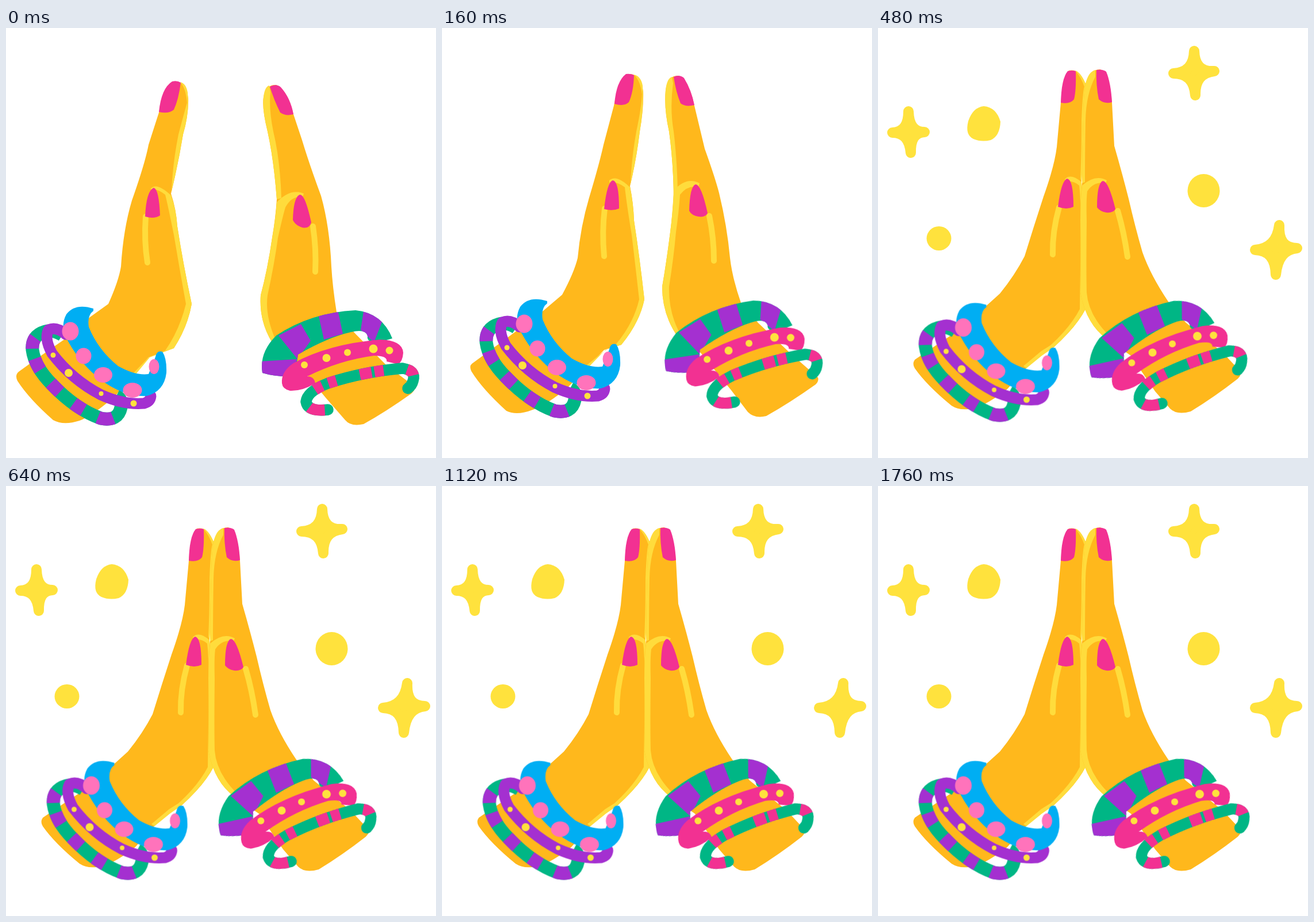
Recreate the animation shown at these times as an HTML page without scripts. Size 748 px wide and 748 px high, loop 1920 ms.

```html
<!DOCTYPE html>
<html lang="en">
<head>
<meta charset="utf-8">
<title>Folded hands</title>
<style>
html, body { margin: 0; width: 100%; height: 100%; overflow: hidden; background: #fff; }
svg { display: block; width: 100vw; height: 100vh; }

.skin { fill: #ffb81c; }
.light { fill: #ffdc3c; }
.nail, .pink { fill: #f23192; }
.crease { fill: none; stroke: #ffdc3c; stroke-width: 10; stroke-linecap: round; }
.band { fill: none; stroke-linejoin: round; }
.green { fill: #00b685; }
.purple { fill: #a430d0; }
.blue { fill: #00aef3; }
.rose { fill: #ff73bb; }
.gold { fill: #ffe23d; }
.star { stroke: #ffe23d; stroke-width: 18; stroke-linejoin: round; }

/* --a: apart, --b: near, --c: pressed */
.hand path { d: var(--c); animation: morph 1.92s infinite; }
.left { animation: slide-left 1.92s infinite; }
.right { transform-origin: 594px 564px; animation: slide-right 1.92s infinite; }
.sparkles { animation: blink 1.92s step-end infinite; }

@keyframes morph {
  0% { d: var(--a); animation-timing-function: steps(2); }
  8.33% { d: var(--b); animation-timing-function: steps(2); }
  16.66%, 100% { d: var(--c); }
}
@keyframes slide-left {
  0% { transform: none; animation-timing-function: steps(2); }
  8.33% { transform: translate(31px, -13px); animation-timing-function: steps(2); }
  16.66%, 100% { transform: translate(36.5px, -6.5px); }
}
@keyframes slide-right {
  0% { transform: translate(0, 0) rotate(0deg); animation-timing-function: steps(2); }
  8.33% { transform: translate(-60px, -16px) rotate(-5deg); animation-timing-function: steps(2); }
  16.66% { transform: translate(-82px, -15px) rotate(-9deg); }
  25% { transform: translate(-82px, -15px) rotate(-9deg); animation-timing-function: steps(4); }
  41.66%, 100% { transform: translate(-78px, -15px) rotate(-9deg); }
}
@keyframes blink {
  0%, 20.83%, 29.16%, 37.49%, 49.99%, 66.66%, 83.33% { visibility: hidden; }
  16.66%, 24.99%, 33.33%, 41.66%, 58.33%, 74.99%, 91.66%, 100% { visibility: visible; }
}
</style>
</head>
<body>
<svg viewBox="0 0 748 748">
  <defs>
    <clipPath id="wide">
      <path d="M446 600Q440 565 470 535Q530 495 608 491Q655 496 672 540L644 548Q627 546 629 536Q626 523 600 529Q560 538 508 568L506 582L490 606Q465 606 446 600Z"/>
    </clipPath>
    <path id="hoop" d="M98 534Q82 524 68 528Q44 535 46 560Q50 590 80 620Q121 663 165 679Q195 685 200 660Q202 645 192 640"/>
    <path id="coil" d="M560 664Q525 668 522 650Q524 632 560 618Q620 598 690 592Q714 596 708 614Q706 622 699 627"/>
  </defs>

  <g class="hand">
    <path class="skin" style="
      --a:path('M291 93Q313 91 317 122Q318 150 308 185Q300 235 287 288Q296 315 298 345Q308 410 323 480Q316 520 292 557L248 573L190 640Q150 675 128 683Q100 692 82 682Q40 645 20 614Q15 604 22 598Q66 566 104 540L146 503L178 480Q196 440 200 415Q204 350 219 300Q242 235 248 203L266 147Q272 110 291 93Z');
      --b:path('M324 80Q345 78 350 110Q351 140 344 180Q338 230 327 275Q333 305 334 335Q344 400 352 472Q344 512 312 551L282 560L220 624Q182 656 158 664Q130 675 112 666Q70 628 51 597Q47 588 52 584Q97 551 135 523L176 492L209 464Q230 425 236 400Q241 345 256 295Q274 235 281 203L299 135Q305 100 324 80Z');
      --c:path('M332 74Q350 70 361 97Q358 120 357 160Q357 220 354 268Q357 300 356 335Q359 400 361 489Q345 520 305 556L270 578L225 628Q190 655 170 660Q145 668 128 657Q85 622 64 592Q59 584 64 577Q102 551 140 526L181 490L212 462Q238 430 255 397Q271 345 288 293Q307 240 311 207L318 130Q322 90 332 74Z')"/>
    <path class="light" style="
      --a:path('M303 94Q313 96 316 112Q319 150 308 185Q300 235 287 288L288 283Q290 235 300 185Q312 140 315 130Q313 105 303 94Z');
      --b:path('M334 81Q346 84 349 100Q351 140 344 180Q338 230 327 275L328 268Q330 225 338 180Q347 138 348 115Q345 92 334 81Z');
      --c:path('M343 74Q352 76 361 97Q358 120 357 160Q357 220 354 268L352 262Q354 220 354 160Q356 110 359 102Q353 85 343 74Z')"/>
    <path class="light" style="
      --a:path('M252 279Q262 268 287 291Q296 315 298 345Q308 410 323 480Q316 520 292 557L250 573L226 602L222 600L248 573L277 561Q302 525 313 480Q302 420 292 360Q282 310 277 290Q262 278 252 282Z');
      --b:path('M291 265Q303 254 327 277Q333 305 334 335Q344 400 352 472Q344 512 312 551L284 560L255 590L250 588L282 562L301 552Q333 515 343 472Q336 410 330 360Q321 305 318 277Q303 266 291 269Z');
      --c:path('M325 263Q335 252 354 268Q357 300 356 335Q359 400 361 489Q345 520 305 556L285 570L258 592L253 588L284 562L300 552Q335 520 351 489Q352 410 353 360Q353 300 350 274Q338 264 325 268Z')"/>
    <path class="crease" style="
      --a:path('M243 328Q240 370 246 408');
      --b:path('M283 314Q278 355 282 397');
      --c:path('M315 312Q303 355 304 394')"/>
    <path class="nail" style="
      --a:path('M266 146Q270 105 289 93Q298 91 304 95Q300 125 292 142Q283 150 266 146Z');
      --b:path('M300 132Q303 93 320 80Q328 79 334 82Q333 112 325 129Q317 137 300 132Z');
      --c:path('M318 130Q319 88 330 75Q338 73 344 75Q345 108 341 124Q334 133 318 130Z')"/>
    <path class="nail" style="
      --a:path('M242 328Q244 283 257 278Q266 280 268 326Q258 333 242 328Z');
      --b:path('M282 315Q287 268 297 265Q308 266 308 314Q297 319 282 315Z');
      --c:path('M313 311Q319 265 329 262Q340 264 340 311Q328 317 313 311Z')"/>
  </g>

  <g class="hand">
    <path class="skin" style="
      --a:path('M470 99Q452 98 448 120Q445 140 455 180Q466 230 471 298Q469 330 463 365Q455 420 443 465Q440 510 463 547L500 575L556 643L590 682Q600 694 622 689Q660 668 705 636Q712 630 711 624L660 585L606 530L575 494Q568 450 566 415Q563 345 548 292Q527 235 515 195L500 150Q490 108 470 99Z');
      --b:path('M411 83Q393 82 389 108Q386 140 395 180Q402 230 403 290Q401 325 397 355Q390 410 383 450Q383 500 412 540L450 565L503 630L532 668Q544 680 564 675Q605 652 650 620Q656 614 654 608L605 565L550 513L520 478Q505 435 501 400Q496 345 482 287Q475 260 457 210L439 135Q430 92 411 83Z');
      --c:path('M387 72Q369 71 361 97Q357 120 357 160Q355 220 355 270Q352 300 352 335Q353 420 352 460Q362 515 398 541L440 570L482 632L508 662Q520 674 544 667Q585 642 626 610Q632 604 631 598L600 565L535 512L505 476Q474 430 460 390Q447 345 436 297Q424 250 411 205L407 130Q404 90 387 72Z')"/>
    <path class="light" style="
      --a:path('M458 100Q450 102 448 120Q445 140 455 180Q466 230 471 298L479 296Q477 230 465 180Q457 140 460 112Z');
      --b:path('M400 85Q391 88 389 108Q386 140 395 180Q402 230 403 290L410 285Q409 230 403 180Q396 140 402 96Z');
      --c:path('M378 73Q366 76 361 97Q357 120 357 160Q355 220 355 270L360 268Q360 220 361 160Q362 115 378 85Z')"/>
    <path class="light" style="
      --a:path('M518 288Q495 278 471 303Q469 330 463 365Q455 420 443 465Q440 510 463 547L470 545Q450 500 455 465Q467 410 473 365Q482 325 486 312Q497 291 516 294Z');
      --b:path('M448 270Q425 258 403 283Q401 325 397 355Q390 410 383 450Q383 500 412 540L418 538Q394 500 395 450Q403 400 407 355Q412 320 414 290Q428 272 446 277Z');
      --c:path('M398 265Q378 254 355 274Q352 300 352 335Q353 420 352 460Q362 515 398 541L403 536Q366 500 363 460Q362 420 363 335Q362 300 364 284Q376 266 396 270Z')"/>
    <path class="crease" style="
      --a:path('M534 345Q540 385 538 424');
      --b:path('M465 327Q473 365 473 405');
      --c:path('M417 318Q428 355 434 398')"/>
    <path class="nail" style="
      --a:path('M459 102Q470 96 478 103Q495 122 500 150Q487 154 477 147Q466 125 459 102Z');
      --b:path('M403 85Q413 80 421 87Q434 108 439 134Q424 138 415 131Q407 112 403 85Z');
      --c:path('M380 73Q391 71 397 76Q405 95 407 129Q394 133 384 124Q379 100 380 73Z')"/>
    <path class="nail" style="
      --a:path('M499 334Q500 294 511 290Q520 288 531 338Q528 350 515 347Q503 343 499 334Z');
      --b:path('M430 318Q431 276 441 272Q451 272 462 322Q458 330 446 328Q434 326 430 318Z');
      --c:path('M381 312Q381 270 391 266Q401 266 413 315Q409 322 397 321Q386 319 381 312Z')"/>
  </g>

  <g class="left">
    <g class="band" stroke-width="23">
      <use href="#hoop" stroke="#00b685"/>
      <use href="#hoop" stroke="#a430d0" stroke-dasharray="0 52 20 18 22 29 22 31 21 28 27 200"/>
    </g>
    <path class="band" stroke="#a430d0" stroke-width="19" stroke-linecap="round" d="M104 533Q88 519 74 525Q66 540 80 566Q115 612 165 638Q205 656 240 653Q251 650 252 640"/>
    <g class="gold">
      <circle cx="82" cy="569" r="4.5"/>
      <circle cx="109" cy="600" r="7"/>
      <circle cx="165.5" cy="636" r="4"/>
      <circle cx="222" cy="653" r="5.5"/>
    </g>
    <path class="blue" d="M152 488Q120 478 105 498Q93 520 108 545Q130 585 165 612Q205 642 245 640Q275 632 279 600Q280 575 272 563Q262 560 260 572Q255 585 248 602Q225 605 195 588Q160 560 144 520Q141 500 152 492Z"/>
    <g class="rose">
      <ellipse cx="112" cy="527.5" rx="14.5" ry="16"/>
      <ellipse cx="135" cy="570.5" rx="13.5" ry="14"/>
      <ellipse cx="169" cy="603.5" rx="16" ry="13.5"/>
      <ellipse cx="220" cy="630" rx="16.5" ry="13"/>
      <ellipse cx="257.5" cy="589" rx="9" ry="13"/>
    </g>
  </g>

  <g class="right">
    <g clip-path="url(#wide)">
      <path class="green" d="M430 480H680V620H430Z"/>
      <path class="purple" d="M440 580L507 576L490 610H440ZM474 535L513 515L530 544L507 576ZM543 497L577 490L586 532L553 542ZM623 486L657 504L640 547L617 525Z"/>
    </g>
    <path class="pink" d="M480 618Q478 598 500 583Q560 550 650 542Q690 543 691 565Q690 580 682 585L662 580Q664 570 640 570Q580 578 524 606Q536 606 538 618Q515 632 494 631Q481 628 480 618Z"/>
    <g class="gold">
      <circle cx="519" cy="586" r="6"/>
      <circle cx="557.5" cy="574" r="7"/>
      <circle cx="594" cy="564.5" r="6"/>
      <circle cx="639" cy="558" r="7.5"/>
      <circle cx="667" cy="561" r="6.5"/>
    </g>
    <g class="band" stroke-width="19.5">
      <use href="#coil" stroke="#00b685" stroke-linecap="round"/>
      <use href="#coil" stroke="#f23192" stroke-dasharray="0 5 28 38 15 11 15 42 21 5 16 41 16 100"/>
    </g>
  </g>

  <g class="sparkles gold">
    <path class="star" d="M550 40Q551 77 585 75Q551 79 552 117Q549 79 514 79Q549 77 550 40Z"/>
    <path class="star" d="M53 145Q54 181 81 181Q56 182 57 217Q54 182 25 182Q53 181 53 145Z"/>
    <path class="star" d="M698 343Q696 383 729 383Q696 386 692 429Q691 387 656 386Q693 383 698 343Z"/>
    <path d="M184 136Q206 138 213 163Q212 188 196 195Q180 199 166 193Q151 186 157 162Q165 138 184 136Z"/>
    <ellipse cx="566.5" cy="283" rx="28" ry="29"/>
    <ellipse cx="106" cy="366" rx="21.5" ry="21"/>
  </g>
</svg>
</body>
</html>
```
